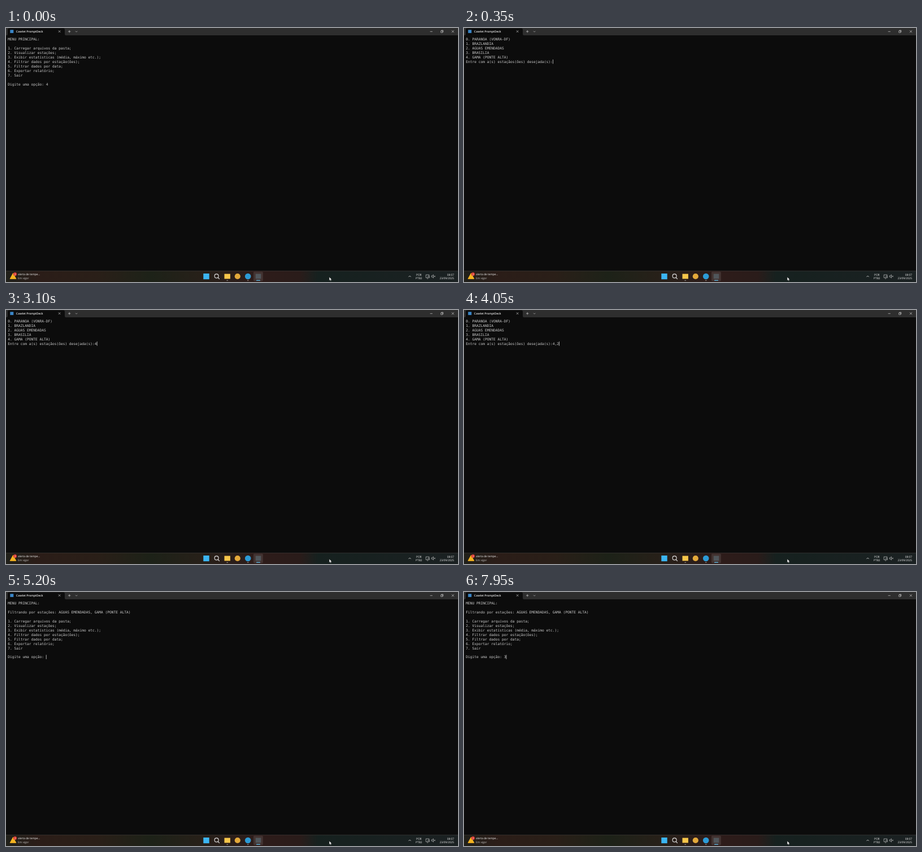
Write an HTML page that moves like this. It is 800 px wide and 450 px high and loops after 8000 ms.

```html
<!DOCTYPE html>
<html lang="pt-BR">
<head>
<meta charset="utf-8">
<title>Terminal</title>
<style>
  html, body { margin: 0; width: 100%; height: 100%; overflow: hidden; background: #0c0c0c; }
  svg { display: block; width: 800px; height: 450px; }
  text { white-space: pre; text-rendering: geometricPrecision; }
  #console text { font: 6.229px "DejaVu Sans Mono", monospace; fill: #ccc; }
  .ui { font: 4.8px "Open Sans", "Noto Sans", sans-serif; fill: #f2f2f2; }
  .tab { font-size: 4.9px; font-weight: 600; }
  .end { text-anchor: end; }
  .mid { text-anchor: middle; }
  .line { fill: none; stroke: #e4e4e4; stroke-width: .6; }
</style>
</head>
<body>
<svg viewBox="0 0 800 450">
  <defs>
    <linearGradient id="bar">
      <stop offset="0" stop-color="#20201a"/>
      <stop offset=".07" stop-color="#2b1d18"/>
      <stop offset=".2" stop-color="#2a1f18"/>
      <stop offset=".32" stop-color="#1d2218"/>
      <stop offset=".43" stop-color="#272019"/>
      <stop offset=".56" stop-color="#2e1c1a"/>
      <stop offset=".65" stop-color="#2a1c1a"/>
      <stop offset=".69" stop-color="#16211f"/>
      <stop offset="1" stop-color="#1b2122"/>
    </linearGradient>
  </defs>
  <rect width="800" height="450" fill="#0c0c0c"/>

  <!-- title bar -->
  <rect width="800" height="13" fill="#2e2e2e"/>
  <path d="M1 13q2 0 2-2V3q0-2.5 2.5-2.5h96q2.500 0 2.500 2.500v8q0 2 2 2z" fill="#0c0c0c"/>
  <rect x="7.300" y="3.300" width="6" height="5.600" fill="#3a86c8"/>
  <text class="ui tab" x="17.800" y="8.200">Caselet PromptDeck</text>
  <g class="line">
    <path d="M92.800 4.300l3.600 3.600m0-3.600l-3.600 3.600"/>
    <path d="M110 6.200h4.400m-2.200-2.200v4.400"/>
    <path d="M123 5.500l1.600 1.600 1.600-1.600"/>
    <path d="M750.600 6.300h4.200"/>
    <path d="M769.700 5.100h3v3.100h-3zM770.700 5v-.9h3v3.100h-.9"/>
    <path d="M788.900 4.200l4 4m0-4l-4 4"/>
  </g>

  <g id="console"></g>

  <!-- taskbar -->
  <rect y="430" width="800" height="20" fill="url(#bar)"/>
  <rect y="430" width="800" height=".6" fill="#3c3a37"/>
  <path d="M12.500 434.600L17.800 444.300H7.200z" fill="#f4b321" stroke="#f4b321" stroke-width="1" stroke-linejoin="round"/>
  <circle cx="16" cy="436" r="3.100" fill="#d93a32"/>
  <text class="ui mid" x="16" y="437.700">2</text>
  <text class="ui" x="21" y="438.300">alerta de tempe...</text>
  <text class="ui" x="21" y="445.200" fill-opacity=".8">Em vigor</text>

  <rect x="349.300" y="435" width="10.400" height="10.200" fill="#3bb5f2"/>
  <g class="line" style="stroke-width:1.100">
    <circle cx="372.600" cy="439.400" r="3.500"/>
    <path d="M375.100 442l2.700 2.800"/>
  </g>
  <rect x="386.500" y="435.600" width="10.400" height="8.800" fill="#f7c64a"/>
  <circle cx="409.800" cy="440" r="5.100" fill="#e3a93a"/>
  <circle cx="428.200" cy="440" r="5.300" fill="#2c9bd6"/>
  <rect x="437.900" y="431.700" width="17" height="16.700" rx="1.800" fill="#fff" fill-opacity=".1"/>
  <rect x="441.700" y="435.600" width="9.600" height="8.600" fill="#50565b"/>
  <rect x="390.300" y="446.700" width="2.800" height="1" rx=".5" fill="#a2a09c"/>
  <rect x="426.800" y="446.700" width="2.800" height="1" rx=".5" fill="#a2a09c"/>
  <rect x="443" y="446.600" width="7" height="1.200" rx=".6" fill="#5cc6f5"/>

  <g class="line">
    <path d="M712.500 441.100l2.100-2.100 2.100 2.100" style="stroke-width:.8"/>
    <path d="M746.500 442.400h-3.300v-5.200h5.700v1.700m-3.900 5.100h2.200m-.2-4.400h2.500v2.800h-2.500z"/>
    <path d="M753.300 438.800h1.300l1.800-1.700v5.800l-1.800-1.700h-1.300zM757.500 438.900l2.200 2.200m0-2.200l-2.200 2.200"/>
  </g>
  <text class="ui mid" x="730.800" y="438.500">POR</text>
  <text class="ui mid" x="730.800" y="445.300">PTB2</text>
  <text class="ui end" x="793" y="438.500">08:07</text>
  <text class="ui end" x="793" y="445.300">23/09/2025</text>
  <path d="M572.200 441.200v6.200l1.400-1.300 1 2.100 1-.5-1-2h1.900z" fill="#fff" stroke="#222" stroke-width=".3"/>
</svg>

<script>
const LOOP = 8000, LEFT = 3.3, TOP = 16, COL = 3.75, ROW = 7.94;

const options = [
  "1. Carregar arquivos da pasta;",
  "2. Visualizar estações;",
  "3. Exibir estatísticas (média, máximo etc.);",
  "4. Filtrar dados por estação(ões);",
  "5. Filtrar dados por data;",
  "6. Exportar relatório;",
  "7. Sair",
];
const menu = (...filter) =>
  ["MENU PRINCIPAL:", "", ...filter, ...options, "", "Digite uma opção: "];
const stations = [
  "0. PARANOA (VONRA-DF)",
  "1. BRAZLANDIA",
  "2. AGUAS EMENDADAS",
  "3. BRASILIA",
  "4. GAMA (PONTE ALTA)",
  "Entre com a(s) estaçãos(ões) desejada(s):",
];
const mainMenu = menu();
const filtered = menu("Filtrando por estações: AGUAS EMENDADAS, GAMA (PONTE ALTA)", "");
const confirm = [...stations.slice(0, -1), stations.at(-1) + "4,2",
  "Pressione Enter para continuar..."];

// start, lines, typed input, then the times at which the cursor blinks off and on
const scenes = [
  [0, mainMenu, "4", 0, 50],
  [350, stations, "", 800, 1100, 1500, 1850, 2300, 2650, 3000],
  [3100, stations, "4", 3550],
  [3600, stations, "4,", 4000],
  [4050, stations, "4,2", 4450],
  [4500, confirm, "", 4900],
  [5200, filtered, "", 5600, 6000, 6350, 6700, 7100, 7500, 7900],
  [7950, filtered, "3"],
];

const screen = document.getElementById("console");
const add = (tag, attrs) => {
  const el = document.createElementNS("http://www.w3.org/2000/svg", tag);
  for (const key in attrs) el.setAttribute(key, attrs[key]);
  return screen.appendChild(el);
};
const rows = filtered.map((_, i) => add("text", { x: LEFT, y: TOP + i * ROW + 6.2 }));
const cursor = add("rect", { width: 0.7, height: 7.6, fill: "#e8e8e8" });

let shown;
function draw(t) {
  const scene = scenes.findLast(s => s[0] <= t);
  const [, lines, input, ...blinks] = scene;
  const last = lines.length - 1;
  if (scene !== shown) {
    rows.forEach((row, i) => {
      row.textContent = (lines[i] || "") + (i === last ? input : "");
    });
    cursor.setAttribute("x", LEFT + (lines[last] + input).length * COL);
    cursor.setAttribute("y", TOP + last * ROW + 0.1);
    shown = scene;
  }
  const off = blinks.filter(b => b <= t).length % 2;
  cursor.setAttribute("visibility", off ? "hidden" : "visible");
}

const start = performance.now();
function tick() {
  draw((performance.now() - start) % LOOP);
  requestAnimationFrame(tick);
}
tick();
</script>
</body>
</html>
```
